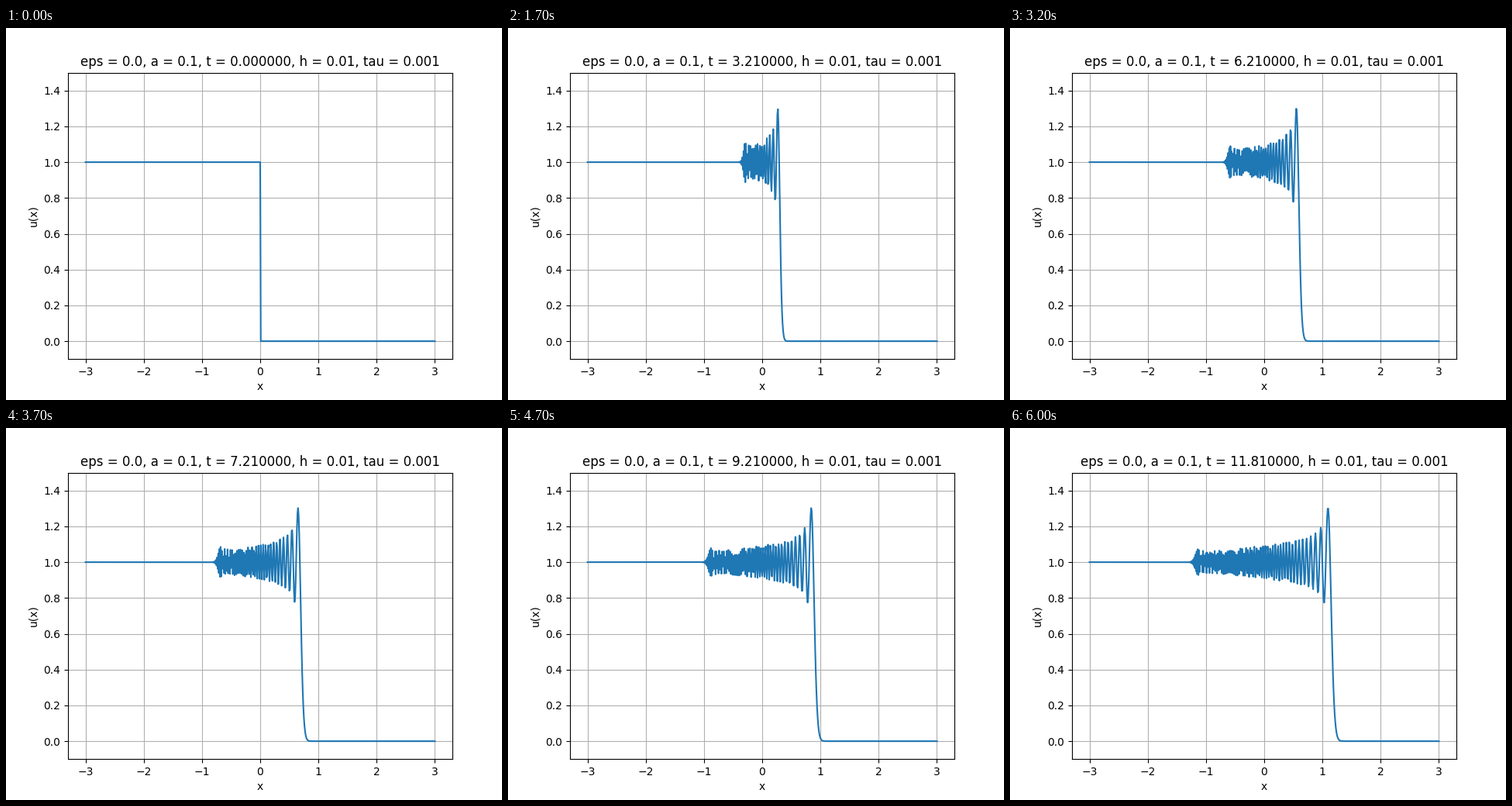
A matplotlib script that plays this animation: 640 px wide and 480 px high, repeating every 6.1 s.

```python
import numpy as np
import matplotlib.pyplot as plt
from matplotlib.animation import FuncAnimation

EPS, A, H, TAU = 0.0, 0.1, 0.01, 0.001
FRAMES = 61
FIRST, STRIDE = 10, 200  # time steps before the first saved state, then between states

x = np.linspace(-3, 3, 601)


def solve():
    """Step profile carried by explicit Euler with central differences."""
    u = np.where(x < H / 2, 1.0, 0.0)
    states = [(0.0, u.copy())]
    drift = A * TAU / (2 * H)
    spread = EPS * TAU / H**2
    for step in range(1, FIRST + STRIDE * (FRAMES - 2) + 1):
        left, mid, right = u[:-2], u[1:-1], u[2:]
        u[1:-1] = mid - drift * (right - left) + spread * (right - 2 * mid + left)
        if step % STRIDE == FIRST:
            states.append((step * TAU, u.copy()))
    return states


states = solve()

fig, ax = plt.subplots(figsize=(6.4, 4.8), dpi=100)
line, = ax.plot(x, states[0][1])
ax.set_xlim(-3.3, 3.3)
ax.set_ylim(-0.1, 1.5)
ax.set_xlabel("x")
ax.set_ylabel("u(x)")
ax.grid(True)
title = ax.set_title("")


def draw(i):
    t, u = states[i]
    line.set_ydata(u)
    title.set_text(f"eps = {EPS}, a = {A}, t = {t:.6f}, h = {H}, tau = {TAU}")
    return line, title


anim = FuncAnimation(fig, draw, frames=FRAMES, init_func=lambda: draw(0),
                     interval=100, repeat=True, repeat_delay=0, blit=False)
plt.show()
```
